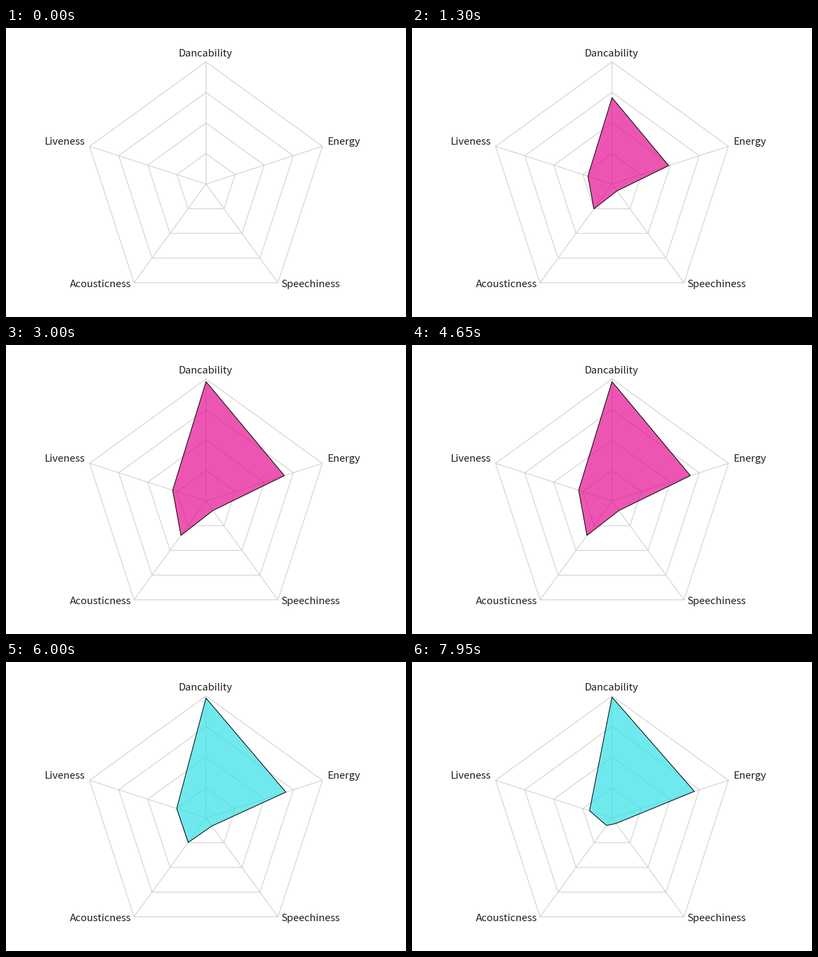
These frames come from a looping animation (588x426 px, 8000 ms). A matplotlib script:

```python
import numpy as np
import matplotlib.pyplot as plt
from matplotlib.animation import FuncAnimation
from matplotlib.patches import Polygon

W, H, DPI = 588, 426, 100
LOOP, STEP = 8000, 50
PX = 72 / DPI  # one pixel in points

CENTER = np.array([294, 230])
RADIUS = 180
ANGLES = np.radians(-90 + 72 * np.arange(5))
AXES = np.column_stack([np.cos(ANGLES), np.sin(ANGLES)])

# Dancability, Energy, Speechiness, Acousticness, Liveness
EMPTY = np.zeros(5)
FIRST = np.array([0.978, 0.673, 0.096, 0.348, 0.286])
SECOND = np.array([0.99, 0.707, 0.055, 0.075, 0.193])
PINK = (0.896, 0.053, 0.574, 0.7)
CYAN = (0.204, 0.882, 0.905, 0.7)

GROW_AT, MORPH_AT, DURATION = 655, 5650, 1500

LABELS = [
    ("Dancability", 293.5, 42, "center"),
    ("Energy", 473, 172, "left"),
    ("Speechiness", 404, 382, "left"),
    ("Acousticness", 184, 382, "right"),
    ("Liveness", 116, 172, "right"),
]

# cubic-bezier(.25, .1, .25, 1)
U = np.linspace(0, 1, 400)
BEZ_X = 0.75 * U * (1 - U) ** 2 + 0.75 * U**2 * (1 - U) + U**3
BEZ_Y = 0.3 * U * (1 - U) ** 2 + 3 * U**2 * (1 - U) + U**3


def ease(t, start):
    return np.interp((t - start) / DURATION, BEZ_X, BEZ_Y)


def points(values):
    return CENTER + RADIUS * np.asarray(values)[:, None] * AXES


fig = plt.figure(figsize=(W / DPI, H / DPI), dpi=DPI, facecolor="white")
ax = fig.add_axes([0, 0, 1, 1])
ax.set_xlim(0, W)
ax.set_ylim(H, 0)
ax.axis("off")

for tip in points(np.ones(5)):
    ax.plot(*zip(CENTER, tip), color="#ccc", lw=PX, snap=False, zorder=1)
for level in (0.25, 0.5, 0.75, 1):
    ax.add_patch(Polygon(points(np.full(5, level)), fill=False, ec="#ccc",
                         lw=PX, snap=False, zorder=1))

for text, x, y, ha in LABELS:
    ax.text(x, y, text, ha=ha, va="baseline", color="#1c1c1c",
            family="Noto Sans CJK JP", size=15 * PX, zorder=3)

radar = Polygon(points(EMPTY), ec="black", lw=PX, snap=False, zorder=2)
ax.add_patch(radar)


def update(i):
    t = i * STEP
    if t < MORPH_AT:
        start, old, new, color = GROW_AT, EMPTY, FIRST, PINK
    else:
        start, old, new, color = MORPH_AT, FIRST, SECOND, CYAN
    radar.set_visible(t > GROW_AT)
    radar.set_facecolor(color)
    radar.set_xy(points(old + (new - old) * ease(t, start)))
    return [radar]


anim = FuncAnimation(fig, update, frames=LOOP // STEP, interval=STEP,
                     repeat=True, repeat_delay=0)
plt.show()
```
